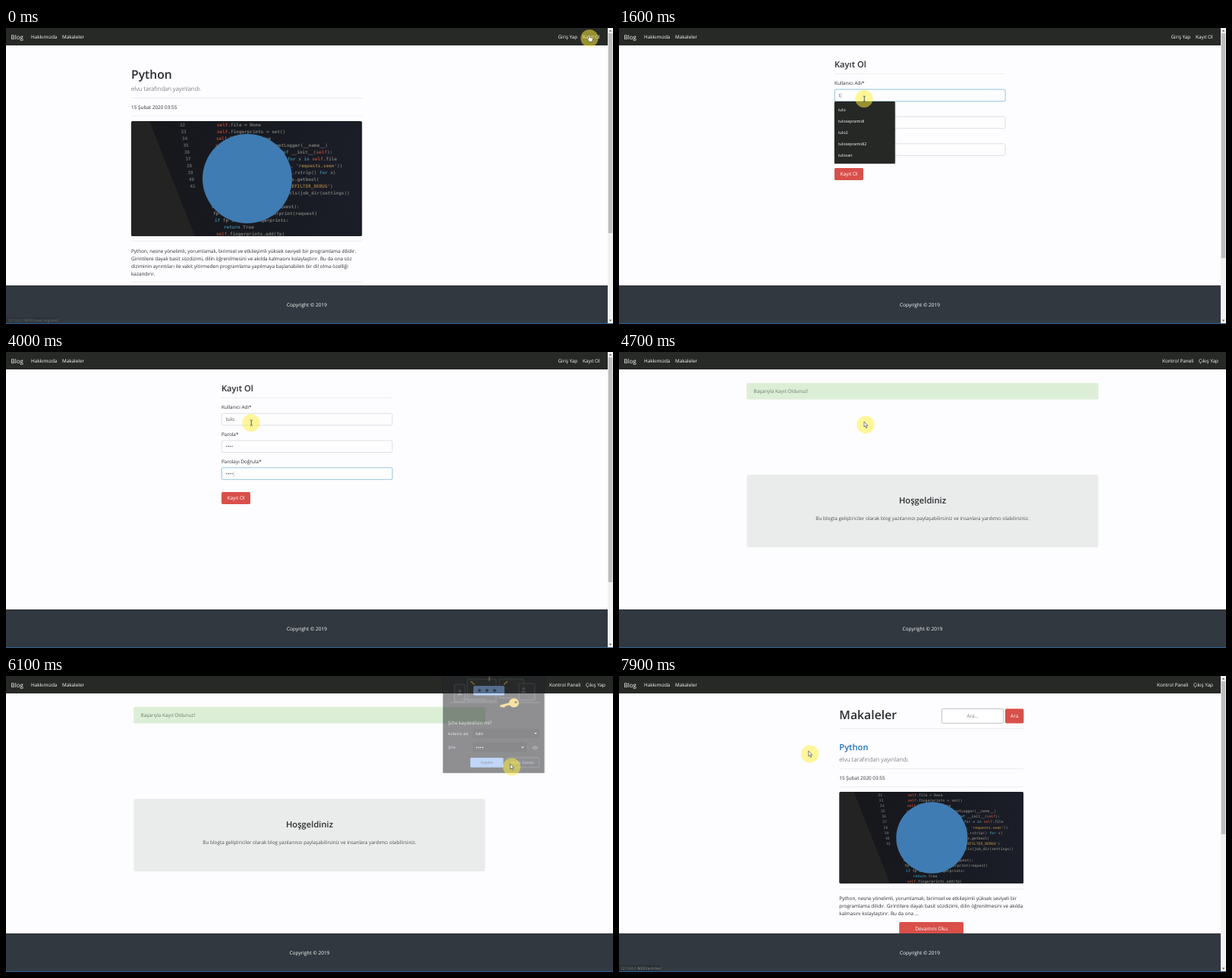
These frames come from a looping animation (800x391 px, 8 s). An HTML page:

```html
<!DOCTYPE html>
<html lang="tr">
<head>
<meta charset="utf-8">
<title>Blog</title>
<style>
  html, body { margin: 0; width: 100%; height: 100%; overflow: hidden; background: #fdfcfe; }
  svg { display: block; width: 800px; height: 391px; }
  text { font-family: "Open Sans", "Noto Sans", sans-serif; text-rendering: geometricPrecision; white-space: pre; }
  .code { font: bold 6px "DejaVu Sans Mono", monospace; }
</style>
</head>
<body>
<svg id="stage" viewBox="0 0 800 391"></svg>
<script>
const LOOP = 8000, STEP = 100;
const INK = '#2a2d30', RED = '#d9504a', BLUE = '#84b2f4';
const MIDDLE = 'text-anchor="middle"', SEMI = 'font-weight="600"', LIGHT = 'font-weight="300"';

const text = (x, y, s, size = 6.4, fill = INK, attr = '') =>
  `<text x="${x}" y="${y}" font-size="${size}" fill="${fill}" ${attr}>${s}</text>`;
const rect = (x, y, w, h, fill, attr = '') =>
  `<rect x="${x}" y="${y}" width="${w}" height="${h}" fill="${fill}" ${attr}/>`;
const path = (d, stroke, attr = '') => `<path d="${d}" fill="none" stroke="${stroke}" ${attr}/>`;
const rule = (x, y, w) => rect(x, y, w, .6, '#e3e3e5');
const lines = (x, y, list) => list.map((s, i) => text(x, y + i * 10, s)).join('');
const button = (x, y, w, h, label, size = 6.5) =>
  rect(x, y, w, h, RED, 'rx="1.7"') + text(x + w / 2, y + h / 2 + 2.4, label, size, '#fff', MIDDLE);

// Screen photo: dim code behind one plain disc
const CODE = [
  ['32', 113, 'self.file = None'],
  ['33', 113, 'self.fingerprints = set()'],
  ['34', 112, 'self.logdupes = True'],
  ['35', 111, 'self.debug = debug    getLogger(__name__)'],
  ['36', 110, 'self.logger = logging   def __init__(self):'],
  ['37', 112, 'if path:                  for x in self.file'],
  ['38', 116, "self.file = open(join(path, 'requests.seen'))"],
  ['39', 118, 'self.fingerprints.update(x.rstrip() for x)'],
  ['40', 96, '@classmethod             settings.getbool('],
  ['41', 96, "def from_settings(cls):     'DUPEFILTER_DEBUG')"],
  ['', 100, 'debug = settings       return cls(job_dir(settings))'],
  ['', 104, ''],
  ['', 106, 'def request_seen(self, request):'],
  ['', 108, 'fp = self.request_fingerprint(request)'],
  ['', 110, 'if fp in self.fingerprints:'],
  ['', 122, 'return True'],
  ['', 112, 'self.fingerprints.add(fp)']
];
const paintCode = s => s
  .replace(/\b(def|return|if|for|in)\b/g, '<tspan fill="#4b9cb4">$1</tspan>')
  .replace(/\bself\b/g, '<tspan fill="#c4523e">self</tspan>')
  .replace(/'[^']*'/g, '<tspan fill="#b08a45">$&</tspan>');
const PHOTO = `<defs>
  <linearGradient id="dusk"><stop stop-color="#17171a"/><stop offset=".4" stop-color="#17191f"/><stop offset="1" stop-color="#1b1d28"/></linearGradient>
  <clipPath id="frame"><rect width="304.5" height="152" rx="2.5"/></clipPath>
  <g id="photo" clip-path="url(#frame)">${rect(0, 0, 304.5, 152, 'url(#dusk)')}<path d="M0 0H24L84 152H0z" fill="#242323"/><g opacity=".8">${
    CODE.map(([n, x, s], i) => {
      const y = 7 + i * 9;
      return `<text class="code" x="${64 + i * 1.5}" y="${y}" fill="#77787c">${n}</text>` +
             `<text class="code" x="${x}" y="${y}" fill="#8a8c82">${paintCode(s)}</text>`;
    }).join('')}</g><circle cx="153" cy="76" r="59" fill="#3f7cb3"/></g></defs>`;
const photo = (x, y, scale) => `<use href="#photo" transform="translate(${x} ${y}) scale(${scale})"/>`;

function chrome(links, center) {
  return rect(0, 0, 800, 391, '#fdfcfe') + rect(0, 0, 800, 23, '#272926') +
    text(6.5, 14.6, 'Blog', 8, '#fff') + text(33, 13.8, 'Hakkımızda', 6.35, '#fff') +
    text(74, 13.8, 'Makaleler', 6.35, '#fff') +
    links.map(([x, s]) => text(x, 13.8, s, 6.35, '#fff')).join('') +
    rect(0, 340, 800, 51, '#31383f') + text(center, 367.7, 'Copyright © 2019', 6.5, '#fff', MIDDLE) +
    rect(0, 389.8, 800, 1.2, '#2d618f');
}

const scrollbar = end => rect(793, 0, 7, 390, '#f1f1f1') + rect(793.8, 7, 5.4, end - 7, '#bdbdbf') +
  '<path d="M794.8 4.4h3.6l-1.8-2zM794.8 385.6h3.6l-1.8 2z" fill="#555"/>';

const status = (url, w, opacity) => opacity <= 0 ? '' :
  `<g opacity="${opacity}">${rect(0, 382, w, 7.8, '#2b3035') + text(2, 387.7, url, 5, '#9a9da0')}</g>`;

const GUEST = [[727.5, 'Giriş Yap'], [760, 'Kayıt Ol']];
const member = x => [[x, 'Kontrol Paneli'], [x + 48, 'Çıkış Yap']];

function byline(x, y, w) {
  return text(x, y, 'elvu tarafından yayınlandı.', 7.95, '#444', LIGHT) + rule(x, y + 9.7, w) +
    text(x, y + 24, '15 Şubat 2020 03:55') + rule(x, y + 33.2, w);
}

function articlePage(t) {
  return chrome(GUEST, 396.5) + scrollbar(271) +
    text(165, 66.7, 'Python', 15.7, INK, SEMI) + byline(165, 82.5, 304.5) + photo(165, 123, 1) +
    rule(165, 281.4, 304.5) +
    lines(165, 296.5, [
      'Python, nesne yönelimli, yorumlamalı, birimsel ve etkileşimli yüksek seviyeli bir programlama dilidir.',
      'Girintilere dayalı basit sözdizimi, dilin öğrenilmesini ve akılda kalmasını kolaylaştırır. Bu da ona söz',
      'diziminin ayrıntıları ile vakit yitirmeden programlama yapılmaya başlanabilen bir dil olma özelliği',
      'kazandırır.']) +
    rule(165, 335.3, 304.5) + status('127.0.0.1:8000/user/register/', 67, t < 100 ? .6 : .9);
}

const typed = (t, ...times) => times.filter(s => s <= t).length;

function registerPage(t) {
  const focus = t < 1200 ? -1 : t < 2300 ? 0 : t < 3300 ? 1 : 2;
  const values = [
    'tulo'.slice(0, typed(t, 1500, 1800, 2000, 2200)),
    '•'.repeat(typed(t, 2500, 2500, 2600, 2600)),
    '•'.repeat(typed(t, 3400, 3600, 3800, 4000))
  ];
  const caretOn = !(t >= 3100 && t < 3300);
  const fields = ['Kullanıcı Adı*', 'Parola*', 'Parolayı Doğrula*'].map((label, i) => {
    const y = 81.2 + i * 35.8, active = i === focus;
    const caret = active && caretOn ? '<tspan dx="-1" font-weight="300">|</tspan>' : '';
    return text(284, y - 6.2, label) +
      (active ? rect(283.6, y - .6, 226.2, 16.8, '#d6ebf5', 'rx="2.2"') : '') +
      rect(284.3, y, 224.8, 15.6, '#fdfdfe', `rx="1.7" stroke-width=".7" stroke="${active ? '#7fb9d4' : '#ced4da'}"`) +
      text(289.5, y + 9.8, values[i] + caret, 6.4, '#4a5057');
  }).join('');
  const names = ['tulo', 'tulosepramidi', 'tulo2', 'tulosepramidi2', 'tulovan'];
  const menu = t < 1300 || t >= 2300 ? '' :
    rect(283.4, 97.4, 81, 82.6, '#000', 'opacity=".25" rx="1.5"') + rect(284, 97, 79.8, 82, '#262826', 'rx="1"') +
    names.map((s, i) => text(289, 110 + i * 15, s, 5.3, '#fff', 'font-weight="500"')).join('');
  return chrome(GUEST, 396.5) + scrollbar(304) +
    text(284, 52.2, 'Kayıt Ol', 11.15, INK, SEMI) + rule(284, 60.2, 225) + fields +
    button(284, 185, 38, 16, 'Kayıt Ol') + menu +
    status('127.0.0.1:8000/user/register/', 67, t < 600 ? .9 : t < 800 ? .45 : 0);
}

function passwordDialog() {
  const grey = '#5f6368';
  const device = (x, y, w, h) => rect(x, y, w, h, '#292b2e', `stroke="${grey}" stroke-width=".8" rx="1"`);
  const person = (x, y) => `<circle cx="${x}" cy="${y}" r="2" fill="${grey}"/>` + rect(x - 3, y + 3, 6, 2.6, grey, 'rx="1.3"');
  const arrow = (x, y) => `<path d="M${x - 1.8} ${y - 1}h3.6l-1.8 2z" fill="#ddd"/>`;
  return rect(575, 0, 135.5, 129, '#000', 'opacity=".2" rx="2"') + rect(576, 0, 133.5, 128, '#232528') +
    device(608, 4, 38, 29) + device(650, 4, 32, 25) + device(591, 11, 14, 23) + device(676, 10, 21, 22) +
    person(598, 20) + person(682, 17) +
    path('M585 35H648M675 35H703M601 31H632', grey, 'stroke-width=".8"') +
    path('M612.5 7l5 4.5M637 1v5.5M661 7l-5 4.5', '#e8b64c', 'stroke-width="1.3"') +
    rect(616, 13, 41, 12.5, BLUE, 'rx="2"') +
    [624, 634, 644].map(x => path(`M${x - 2.5} 19.2h5M${x - 1.2} 17l2.4 4.4M${x + 1.2} 17l-2.4 4.4`, '#263b5c', 'stroke-width=".9"')).join('') +
    path('M665 36.5L651.5 40M656 39l.5 2.5', '#f2c94c', 'stroke-width="3"') +
    '<ellipse cx="669.5" cy="35.5" rx="6.5" ry="6" fill="#f2c94c"/><circle cx="672" cy="34.6" r="1.5" fill="#3a3528"/>' +
    text(582.5, 64, 'Şifre kaydedilsin mi?', 6.1, '#e8eaed') +
    text(582.5, 77.7, 'Kullanıcı adı', 4.8, '#e0e3e8') + rect(615, 69.5, 88, 12.8, '#17181a', 'rx="1"') +
    text(619, 78, 'tulo', 5.3, '#fff') + arrow(698, 76) +
    text(582.5, 96, 'Şifre', 4.8, '#b9d0f0') + rect(615, 88, 71, 12.6, '#17181a', 'rx="1"') +
    text(619, 96.6, '••••', 7, '#fff') + arrow(681, 94.4) +
    path('M694 95q3.3-4.5 6.6 0q-3.3 2.5-6.6 0M697 94.6h.8', '#9aa0a6', 'stroke-width=".8"') +
    rect(612, 108, 43.5, 12.8, BLUE, 'rx="1.3"') + text(633.8, 116, 'Kaydet', 4.9, '#26303f', MIDDLE) +
    rect(658.8, 108, 43.6, 12.8, 'none', `rx="1.3" stroke="${grey}" stroke-width=".7"`) +
    text(680.5, 116, 'Hiçbir Zaman', 4.9, '#a9c8f5', MIDDLE);
}

function homePage(t) {
  const shown = t < 4800 || t >= 6200 ? 0 : t < 4900 || t >= 6100 ? .5 : 1;
  const hover = t < 7000 ? 0 : Math.min(.9, (t - 6900) * .003);
  return chrome(member(716), 400) +
    rect(168.5, 41.2, 463, 21, '#dcefd6', 'rx="1.7" stroke="#d2e8cc" stroke-width=".5"') +
    text(177.5, 54, 'Başarıyla Kayıt Oldunuz!', 6.4, '#6c776c') +
    rect(168.5, 162.2, 463, 95.8, '#e9ecea', 'rx="2"') +
    text(400, 199.7, 'Hoşgeldiniz', 11.2, INK, SEMI + ' ' + MIDDLE) +
    text(400, 222, 'Bu blogta geliştiriciler olarak blog yazılarınızı paylaşabilirsiniz ve insanlara yardımcı olabilirsiniz.', 6.4, '#4a4d50', MIDDLE) +
    status('127.0.0.1:8000/articles/', 55, hover) +
    (shown ? `<g opacity="${shown}">${passwordDialog()}</g>` : '');
}

function listPage() {
  const x = 290.3, w = 243;
  return chrome(member(709), 396.5) + scrollbar(209) +
    text(x, 57, 'Makaleler', 15.8, INK, SEMI) +
    rect(425.5, 43.3, 81.3, 19, '#fff', 'rx="1.5" stroke="#98989c" stroke-width=".6"') +
    text(466, 54.6, 'Ara...', 6.4, '#7b7f84', MIDDLE) + button(509, 43.3, 24.4, 19.2, 'Ara') + rule(x, 69.3, w) +
    text(x, 98, 'Python', 11.15, '#2170bd', SEMI) + byline(x, 112.8, w) + photo(x, 153, .798) + rule(x, 281.4, w) +
    lines(x, 296, [
      'Python, nesne yönelimli, yorumlamalı, birimsel ve etkileşimli yüksek seviyeli bir',
      'programlama dilidir. Girintilere dayalı basit sözdizimi, dilin öğrenilmesini ve akılda',
      'kalmasını kolaylaştırır. Bu da ona ...']) +
    `<svg x="369" y="325" width="86" height="15">${button(.3, 0, 84.7, 17, 'Devamını Oku')}</svg>` +
    status('127.0.0.1:8000/articles/', 55, .9);
}

// Pointer stops: time, x, y
const STOPS = [
  [0, 769, 13.5], [200, 769, 13.5], [400, 740.5, 38], [1100, 323, 93.5], [4200, 323, 93.5],
  [4300, 324, 95], [4500, 325, 96], [5100, 325, 96], [5400, 630.5, 106], [5900, 683, 116], [6000, 683, 116],
  [6200, 650, 124], [6700, 112, 29], [6900, 85, 13], [7400, 85, 13], [7900, 251.7, 103], [LOOP, 251.7, 103]
];
function pointer(t) {
  const i = STOPS.findIndex(s => s[0] > t), [t0, x0, y0] = STOPS[i - 1], [t1, x1, y1] = STOPS[i];
  const u = (t - t0) / (t1 - t0), e = u * u * (3 - 2 * u);
  const x = x0 + (x1 - x0) * e, y = y0 + (y1 - y0) * e;
  const hand = t < 300 || (t >= 6900 && t < 7500), beam = t >= 1100 && t < 4700;
  const shape = beam ? path('M-1.2-3.5h1l.5.5l.5-.5h1M.3-3V3M-1.2 3.5h1l.5-.5l.5.5h1', '#333', 'stroke-width=".8"')
    : hand ? '<path d="M-1.2-4.2q1-1 1.7 0V-1l3 .7q1 .3.8 1.5L3.6 4.5H-.2L-3 1q0-1.2 1.8 0z" fill="#fff" stroke="#333" stroke-width=".5"/>'
    : '<path d="M-2-4V3L-.4 1.6L.8 4.4L2 3.8L.8 1.2H3z" fill="#fff" stroke="#333" stroke-width=".6"/>';
  return `<g transform="translate(${x} ${y})"><circle r="11.6" fill="#fff03c" opacity=".52"/>${shape}</g>`;
}

const page = t => (t < 300 ? articlePage : t < 4700 ? registerPage : t < 7500 ? homePage : listPage)(t);

const stage = document.getElementById('stage');
let shownAt = -1;
function draw() {
  const t = Math.floor(performance.now() % LOOP / STEP) * STEP;
  if (t !== shownAt) stage.innerHTML = PHOTO + page(t) + pointer(t);
  shownAt = t;
  requestAnimationFrame(draw);
}
draw();
</script>
</body>
</html>
```
